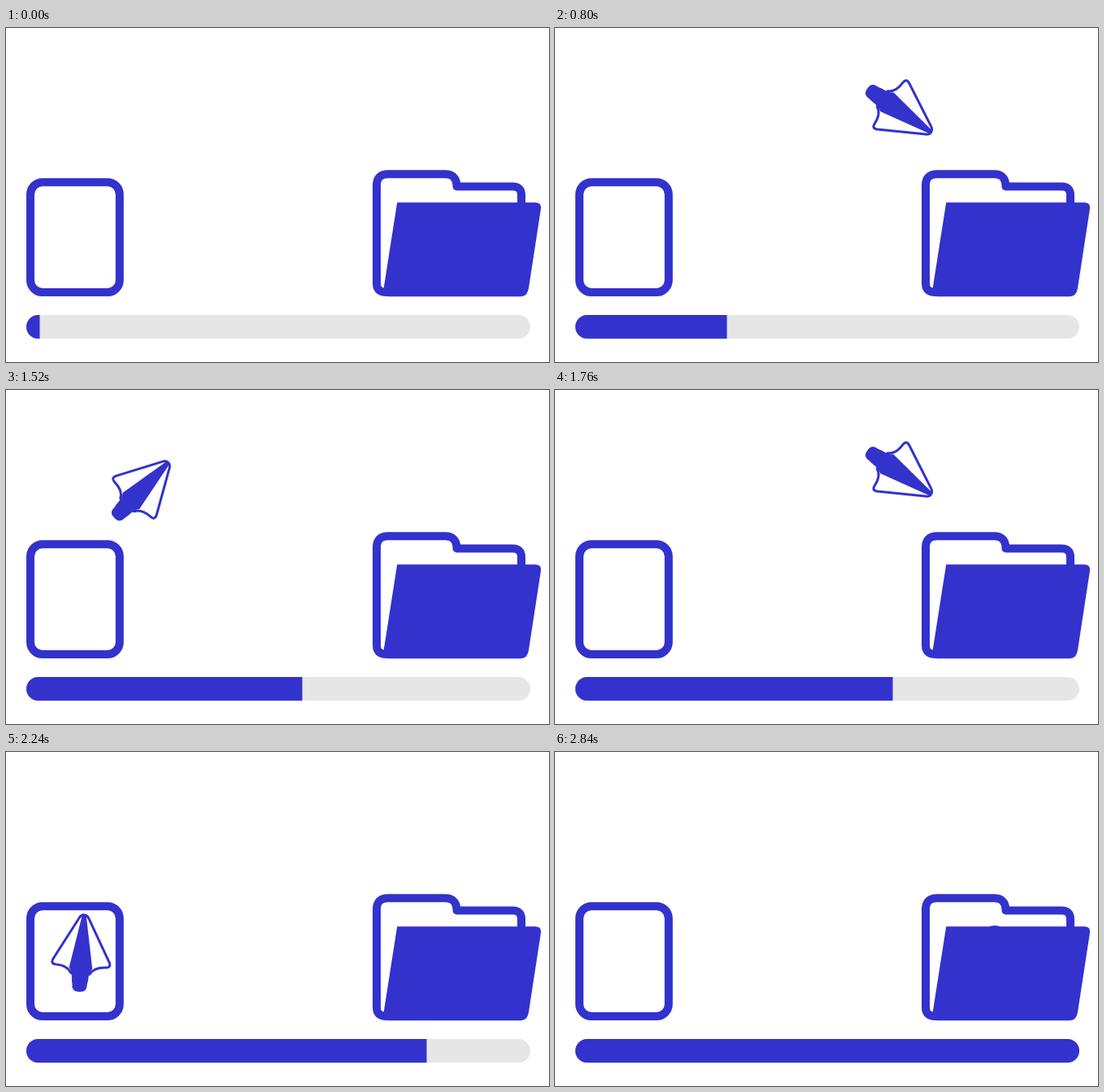
Write an HTML page that moves like this. It is 668 px wide and 412 px high and loops after 2.88 s.

```html
<!DOCTYPE html>
<html lang="en">
<head>
<meta charset="utf-8">
<title>File transfer</title>
<style>
  html, body { margin: 0; width: 100%; height: 100%; overflow: hidden; background: #fff; }
  svg { display: block; width: 100%; height: 100%; }
  .line { fill: none; stroke: #3332cc; stroke-width: 10; stroke-linejoin: round; }
  .solid { fill: #3332cc; }
  .wing { fill: #fff; stroke: #3332cc; stroke-width: 3; stroke-linejoin: round; }
</style>
</head>
<body>
<svg viewBox="0 0 668 412">
  <defs>
    <clipPath id="pill"><rect x="25" y="354" width="620" height="29.3" rx="14.6"/></clipPath>
    <path id="route" d="M86.5 264.5C193 -17 406 -17 541 262.5"/>
    <g id="half">
      <path class="wing" d="M0 -46.8C-3 -46.8 -4.6 -45.2 -6 -42.5L-34.5 9.5C-36.8 14 -35.2 16.2 -31 16.4C-22 16.6 -15 19 -11.5 26L0 26"/>
      <path class="solid" d="M1 -47.5L-2.5 -46L-14.3 19C-11 23 -10.3 28 -10.2 32C-10 36 -9 38 -9 41C-9 45.5 -6 48.2 -2 48.2L1 48.2Z"/>
    </g>
  </defs>

  <rect class="line" x="30" y="190.2" width="109.8" height="135.8" rx="15"/>
  <path class="line" d="M474 326H468Q456 326 456 315V194Q456 180.3 470 180.3H540Q554.5 180.3 554.5 195.5H623Q634 195.5 634 206V225"/>

  <g id="plane">
    <use href="#half"/>
    <use href="#half" transform="scale(-1 1)"/>
  </g>

  <path class="solid" d="M481.2 215.2H651Q659 215.2 658 223L643 321Q641.5 331.2 633 331.2H470L464.6 321.5Z"/>

  <g clip-path="url(#pill)">
    <rect x="25" y="354" width="620" height="30" fill="#e6e6e6"/>
    <rect id="fill" class="solid" x="25" y="354" height="30"/>
  </g>
</svg>
<script>
  const LOOP = 2880, FLIGHT = 960, STEP = 40;
  const LAUNCH = 200, LAND = 920;
  const get = id => document.getElementById(id);
  const plane = get('plane'), route = get('route'), fill = get('fill');
  const length = route.getTotalLength();
  const clamp = v => Math.min(1, Math.max(0, v));

  function draw(ms) {
    const t = Math.floor((ms % LOOP) / STEP) * STEP;
    fill.setAttribute('width', 16.5 + 0.2125 * t);

    // Fade in on the page, then accelerate along the route into the folder.
    const phase = t % FLIGHT;
    const p = clamp((phase - LAUNCH) / (LAND - LAUNCH)) ** 2;
    const { x, y } = route.getPointAtLength(p * length);
    plane.setAttribute('transform', `translate(${x} ${y}) rotate(${181 * p - 1.2})`);
    plane.setAttribute('opacity', clamp(phase / 160));
  }

  const start = performance.now();
  function tick() {
    draw(performance.now() - start);
    requestAnimationFrame(tick);
  }
  tick();
</script>
</body>
</html>
```
